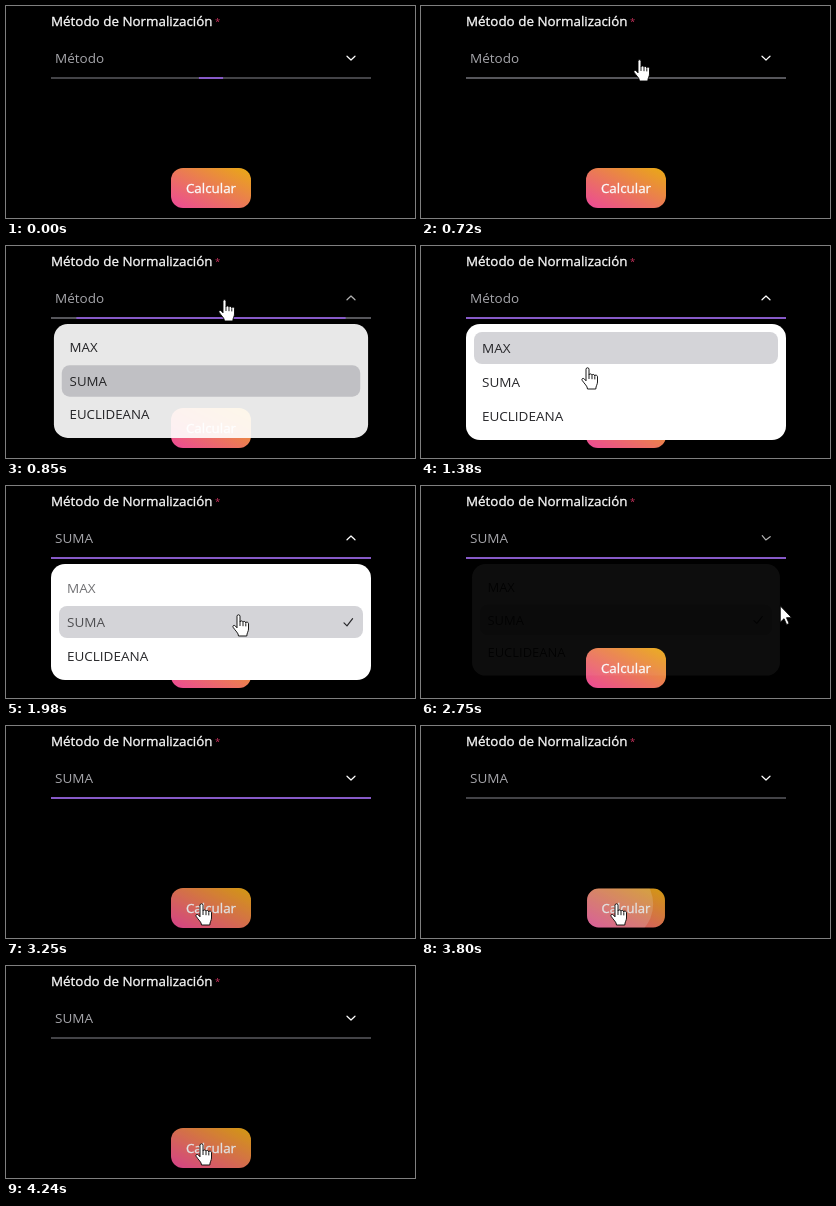
Recreate the animation shown at these times as an HTML page. Size 409x212 px, loop 5.44 s.

```html
<!DOCTYPE html>
<html lang="es">
<head>
<meta charset="utf-8">
<title>Método de Normalización</title>
<style>
  html, body { margin: 0; width: 100%; height: 100%; overflow: hidden; background: #000; }
  svg { display: block; width: 409px; height: 212px; }
  text { font: 13.5px "Open Sans", "Noto Sans", sans-serif; }
  .firm { font-size: 13.4px; fill: #fafafa; stroke: #fafafa; stroke-width: .3; }
  .star { font-size: 9.5px; fill: #c4305a; }
  .stroke { fill: none; stroke-width: 1.2; stroke-linecap: round; stroke-linejoin: round; }
  .cursor { fill: #fff; stroke: #000; stroke-width: .9; stroke-linejoin: round; }
</style>
</head>
<body>
<svg viewBox="0 0 409 212">
  <defs>
    <linearGradient id="warm" x1="0" y1="1" x2="1" y2="0">
      <stop stop-color="#ec4899"/><stop offset="1" stop-color="#e9ab12"/>
    </linearGradient>
    <clipPath id="buttonShape"><rect x="165" y="162" width="80" height="40" rx="12"/></clipPath>
  </defs>

  <text class="firm" x="45" y="20">Método de Normalización</text>
  <text class="star" x="209" y="19">*</text>
  <text id="value" x="49" y="57" fill="#a6a6ab"></text>
  <path id="chevron" class="stroke" stroke="#fff" d="M341 50.2L345 54L349 50.2"/>
  <rect id="baseline" x="45" y="71" width="320" height="2"/>
  <rect id="underline" y="71" height="2" fill="#875ac8"/>

  <g id="button">
    <rect x="165" y="162" width="80" height="40" rx="12" fill="url(#warm)"/>
    <text class="firm" x="205" y="187" text-anchor="middle">Calcular</text>
    <circle id="ripple" cx="195" cy="178" fill="#fff" clip-path="url(#buttonShape)"/>
  </g>

  <g id="popup">
    <rect x="45" y="78" width="320" height="116" rx="14" fill="#fff"/>
    <rect id="hoverMax" x="53" y="86" width="304" height="32" rx="8" fill="#d4d4d8"/>
    <rect id="hoverSuma" x="53" y="120" width="304" height="32" rx="8" fill="#d4d4d8"/>
    <text id="max" x="61" y="107">MAX</text>
    <text id="suma" x="61" y="141">SUMA</text>
    <text x="61" y="175" fill="#27272a">EUCLIDEANA</text>
    <path id="check" class="stroke" stroke="#27272a" d="M338 136.8L341 139.8L346.6 132.6"/>
  </g>

  <g id="hand" class="cursor">
    <path d="M5 2.2C5 .3 8 .3 8 2.2V8c0-1.6 3-1.4 3 .4 0-1.5 2.8-1.3 2.8.6 0-1.4 2.7-1.1 2.7.7V15c0 2.5-1.7 4-1.7 7H6.5C6.5 19 3.5 17 1.2 13.4.2 11.8 2 10.6 3.4 12L5 13.8Z"/>
    <path d="M8 8v4M11 8.6v3.6M13.8 9.2v3.2" fill="none"/>
  </g>
  <path id="arrow" class="cursor" d="M0 0V16.5L3.8 12.9 6.4 18.8 8.9 17.7 6.3 11.9H11.5Z"/>
</svg>
<script>
const LOOP = 5440, OPEN = 767, PICK = 1890, CLOSE = 2628, PRESS = 3640;
const CURSOR_PATH = [
  [30, 255, 190], [550, 218, 54], [850, 218, 54], [1170, 172, 96], [1200, 172, 97],
  [1380, 166, 122], [1720, 232, 129], [1980, 232, 129], [2430, 387, 110],
  [2660, 387, 110], [3040, 195, 178], [LOOP, 195, 178]
];

const el = id => document.getElementById(id);
const set = (id, attrs) => {
  for (const name in attrs) el(id).setAttribute(name, attrs[name]);
};
const clamp = x => Math.min(1, Math.max(0, x));
const mix = (a, b, p) => a + (b - a) * p;
const grey = v => `rgb(${v},${v},${v + 3})`;

// CSS-style cubic-bezier, solved by bisection
const bezier = (x1, y1, x2, y2) => x => {
  const curve = (a, b, u) => 3 * a * u * (1 - u) ** 2 + 3 * b * u * u * (1 - u) + u ** 3;
  let low = 0, high = 1;
  for (let i = 0; i < 20; i++) {
    const mid = (low + high) / 2;
    if (curve(x1, x2, mid) < x) low = mid; else high = mid;
  }
  return curve(y1, y2, low);
};
const standard = bezier(.4, 0, .2, 1);
const easeOut = bezier(0, 0, .58, 1);
const ramp = (t, start, duration, ease = standard) => {
  const x = clamp((t - start) / duration);
  return x === 0 || x === 1 ? x : ease(x);
};

function cursorAt(t) {
  const i = Math.max(1, CURSOR_PATH.findIndex(key => key[0] > t));
  const [t0, x0, y0] = CURSOR_PATH[i - 1], [t1, x1, y1] = CURSOR_PATH[i];
  const u = clamp((t - t0) / (t1 - t0)), p = u * u * (3 - 2 * u);
  return { x: mix(x0, x1, p), y: mix(y0, y1, p) };
}

function drawField(t, cursor) {
  const hover = t >= 30 && cursor.x > 45 && cursor.x < 365 && cursor.y > 35 && cursor.y < 73;
  set("baseline", { fill: hover ? "#56565b" : "#434347" });
  el("value").textContent = t < PICK ? "Método" : "SUMA";

  const width = 320 * (t < OPEN ? 1 - ramp(t, -100, 150)
    : ramp(t, OPEN, 150) - ramp(t, PRESS, 150));
  set("underline", { x: 205 - width / 2, width });

  const turn = ramp(t, OPEN, 83) - ramp(t, 2660, 120);
  const moving = (t > OPEN && t < OPEN + 200) || (t > CLOSE && t < CLOSE + 150);
  set("chevron", { transform: `rotate(${180 * turn} 345 52)`, opacity: moving ? .7 : 1 });
}

function drawPopup(t) {
  const age = Math.max(0, t - OPEN) * .0477;
  const enter = 1 - (1 + age) * Math.exp(-age);
  const exit = ramp(t, CLOSE, 150, easeOut);
  const scale = mix(.8, 1, enter) * mix(1, .96, exit);
  set("popup", {
    opacity: enter * (1 - exit),
    transform: `translate(205 78) scale(${scale}) translate(-205 -78)`
  });

  const onMax = ramp(t, 1090, 80) - ramp(t, 1385, 100);
  set("hoverMax", { opacity: onMax });
  set("hoverSuma", { opacity: 1 - onMax });
  const open = t < CLOSE;
  set("max", { fill: grey(Math.round(mix(39, 113, open ? ramp(t, 1400, 150) : 0))) });
  set("suma", { fill: grey(open && t >= PICK ? 78 : 39) });
  set("check", { opacity: t < PICK ? 0 : 1 });
}

function drawButton(t) {
  const press = ramp(t, PRESS, 100) - ramp(t, PRESS + 110, 250);
  const wave = ramp(t, PRESS, 500, easeOut);
  set("button", {
    opacity: mix(1, .9, ramp(t, 3000, 250)),
    transform: `translate(205 182) scale(${1 - .03 * press}) translate(-205 -182)`
  });
  set("ripple", { r: 80 * wave, opacity: .35 * (1 - wave) });
}

function drawCursor(t, { x, y }) {
  const inside = (left, top, right, bottom) => x > left && x < right && y > top && y < bottom;
  const pointing = inside(45, 35, 365, 73) || inside(165, 162, 245, 202)
    || (t > OPEN && t < CLOSE && inside(45, 73, 365, 194));
  const visible = t >= 30;
  set("hand", { transform: `translate(${x - 6} ${y - 1})`, opacity: visible && pointing ? 1 : 0 });
  set("arrow", { transform: `translate(${x} ${y})`, opacity: visible && !pointing ? 1 : 0 });
}

const began = performance.now();
function frame() {
  const t = (performance.now() - began) % LOOP;
  const cursor = cursorAt(t);
  drawField(t, cursor);
  drawPopup(t);
  drawButton(t);
  drawCursor(t, cursor);
  requestAnimationFrame(frame);
}
frame();
</script>
</body>
</html>
```
